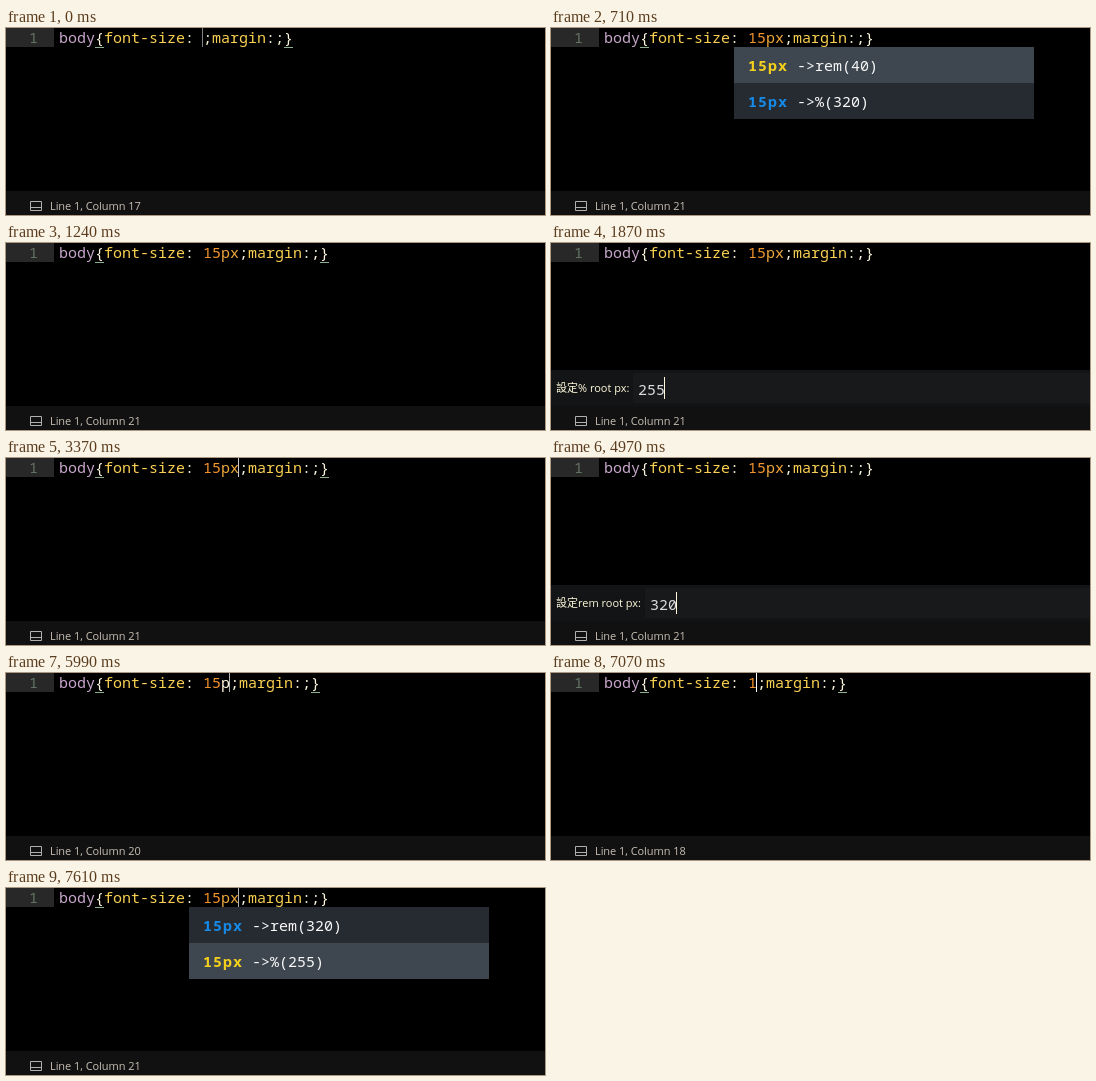
These frames come from a looping animation (539 by 187 pixels, 8 s). An HTML page:

```html
<!DOCTYPE html>
<html lang="en">
<head>
<meta charset="utf-8">
<title>Editor completion</title>
<style>
html, body { margin: 0; width: 100%; height: 100%; overflow: hidden; background: #000; }
svg { display: block; }
text { white-space: pre; font: 500 15px "Noto Sans Mono", monospace; }
.ui { font: 500 11px "Open Sans", "Noto Sans CJK TC", "Noto Sans CJK JP", "Noto Sans CJK", sans-serif; }
.status { letter-spacing: -.06px; }
.key { font-weight: 700; letter-spacing: 1px; }
</style>
</head>
<body>
<svg id="stage" width="539" height="187" viewBox="0 0 539 187"></svg>
<script>
const LOOP = 8000, CELL = 9, LEFT = 53;
const stage = document.getElementById('stage');
const first = { sel: 0, rem: 40, pct: 320 };
const second = { sel: 1, rem: 320, pct: 255 };
const pct = value => ({ unit: '%', x: 87, value });
const rem = value => ({ unit: 'rem', x: 99, value });

// [start ms, typed size, caret opacity, popup, input panel]
const steps = [
  [0, '', .5],
  [80, '1', 1], [200, '15', 1], [320, '15p', 1], [430, '15px', 1],
  [520, '15px', 1, first], [620, '15px', .5, first], [710, '15px', 0, first],
  [930, '15px', .5, first], [1090, '15px', 1, first],
  [1240, '15px', 0],
  [1320, '15px', 1, null, pct('')], [1430, '15px', .5, null, pct('')],
  [1560, '15px', 1, null, pct('2')], [1700, '15px', 1, null, pct('25')],
  [1870, '15px', 1, null, pct('255')],
  [2170, '15px', 1], [2570, '15px', .5], [2720, '15px', 0],
  [3270, '15px', .5], [3370, '15px', .8],
  [3500, '15px', 1, null, rem('')], [3820, '15px', .75, null, rem('')],
  [3900, '15px', .5, null, rem('')], [3970, '15px', .25, null, rem('')],
  [4050, '15px', 0, null, rem('')], [4500, '15px', .5, null, rem('')],
  [4590, '15px', 1, null, rem('')], [4690, '15px', 1, null, rem('3')],
  [4820, '15px', 1, null, rem('32')], [4970, '15px', 1, null, rem('320')],
  [5120, '15px', 1], [5540, '15px', .66], [5610, '15px', .33], [5690, '15px', 0],
  [5990, '15p', .7], [6150, '15', 1], [6370, '1', 1], [6600, '', 1],
  [6990, '', .5], [7070, '1', 1], [7150, '15', 1],
  [7460, '15p', 1], [7530, '15px', 1], [7610, '15px', .7, second]
];

const rect = (x, y, w, h, fill, alpha = 1) =>
  `<rect x="${x}" y="${y}" width="${w}" height="${h}" fill="${fill}" opacity="${alpha}"/>`;
const text = (x, y, fill, body, cls = '') =>
  `<text x="${x}" y="${y}" fill="${fill}" class="${cls}">${body}</text>`;

function codeLine(typed, focused) {
  let col = 0, out = '';
  const put = (word, fill) => {
    out += text(LEFT + col * CELL, 15, fill, word);
    if (focused && '{}'.includes(word)) out += rect(LEFT + col * CELL, 19, CELL, 1, '#8fb08f');
    col += word.length;
  };
  put('body', '#c8a6cc');
  put('{', '#fff8e0');
  put('font-size', '#fad152');
  put(': ', '#fff8e0');
  if (typed) put(typed.slice(0, 2), '#f6952c');
  if (typed.length > 2) put(typed.slice(2), typed.endsWith('px') ? '#f0a83c' : '#fff8e0');
  put(';', '#fff8e0');
  put('margin', '#fad152');
  put(':;', '#fff8e0');
  put('}', '#fff8e0');
  return out;
}

function popupRow(i, label, sel) {
  const on = i === sel, y = 19 + i * 36;
  return rect(183, y, 300, 36, on ? '#3e474f' : '#262b32') +
    text(197, y + 24, on ? '#f4d01c' : '#168ae6', '15px', 'key') +
    text(246, y + 24, '#f8f8f8', '-&gt;' + label);
}

function inputPanel({ unit, x, value }, caret) {
  return rect(0, 127, 539, 36, '#131415') +
    rect(x - 5, 130, 544 - x, 30, '#17191b') +
    text(5, 149, '#fffadc', `設定${unit} root px:`, 'ui') +
    text(x, 152, '#dcdcdc', value) +
    rect(x - 1 + value.length * CELL, 134, 1, 22, '#fffadc', caret);
}

function render([, typed, caret, popup, panel]) {
  let out = rect(0, 0, 539, 187, '#000') + rect(0, 0, 48, 19, '#282828') +
    text(23, 15, '#647464', '1') + codeLine(typed, !panel);
  if (!panel) out += rect(LEFT - 1 + (16 + typed.length) * CELL, 0, 1, 19, '#fff', caret);
  if (popup) out += popupRow(0, `rem(${popup.rem})`, popup.sel) + popupRow(1, `%(${popup.pct})`, popup.sel);
  if (panel) out += inputPanel(panel, caret);
  out += rect(0, 163, 539, 24, '#111112') +
    '<path d="M24.5 173.5h11v9h-11zM24.5 179.5h11" fill="none" stroke="#b0b0b0"/>' +
    text(44, 182, '#c8c0b4', `Line 1, Column ${17 + typed.length}`, 'ui status');
  stage.innerHTML = out;
}

let shown;
function tick() {
  const t = performance.now() % LOOP;
  const step = steps.findLast(s => s[0] <= t);
  if (step !== shown) render(shown = step);
  requestAnimationFrame(tick);
}
tick();
</script>
</body>
</html>
```
